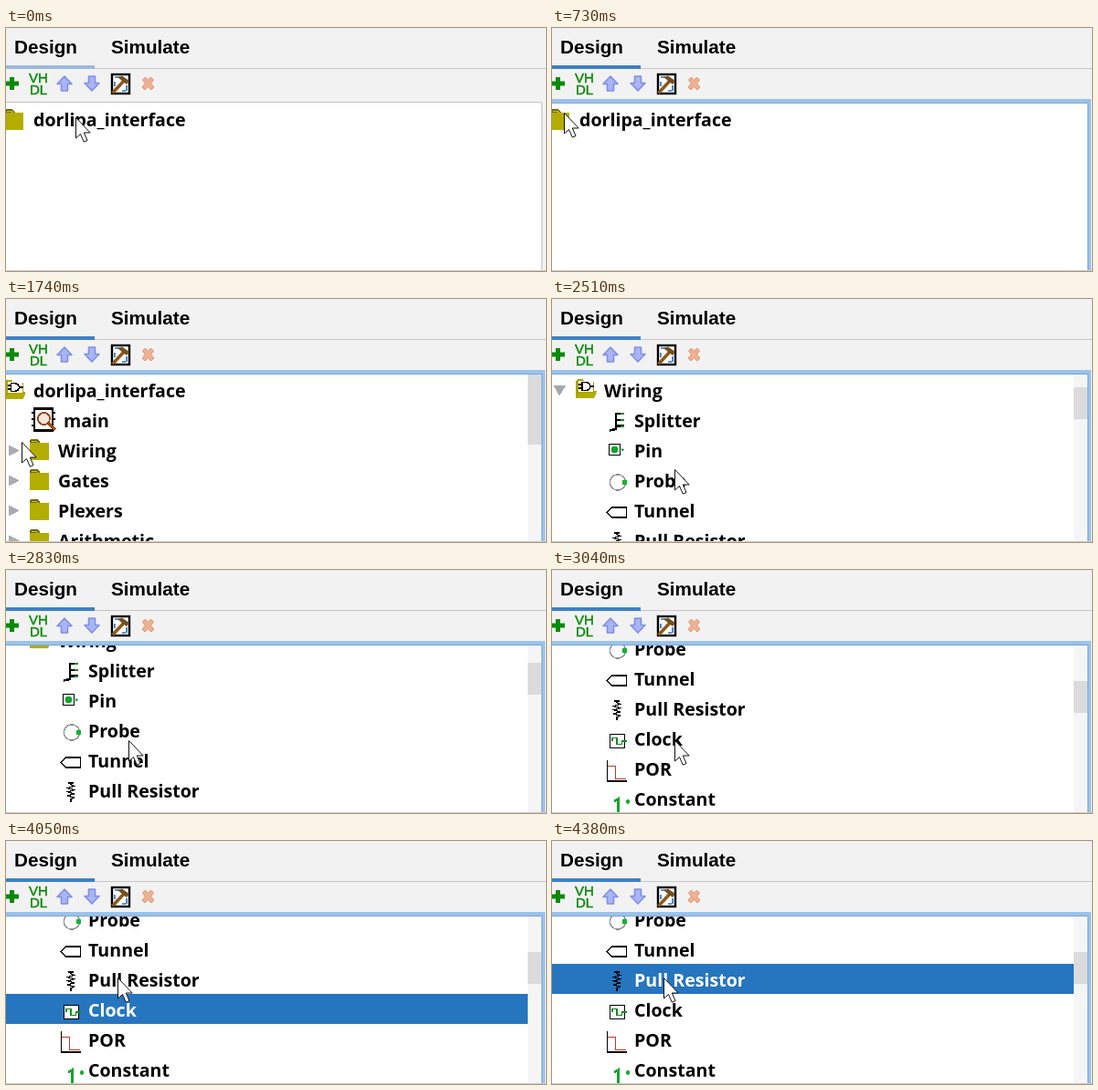
Write an HTML page that moves like this. It is 591 px wide and 267 px high and loops after 4910 ms.

```html
<!DOCTYPE html>
<html lang="en">
<head>
<meta charset="utf-8">
<title>Component tree</title>
<style>
  html, body { margin: 0; width: 100%; height: 100%; overflow: hidden; background: #f2f2f2; }
  svg { display: block; }
  .tab { font: 700 20.7px "Liberation Sans", Arial, sans-serif; }
  .row { font: 700 19.6px "Open Sans", "Noto Sans", sans-serif; }
  .vhdl { font: 15px "Liberation Sans", Arial, sans-serif; fill: #0a8a0a; stroke: #0a8a0a; stroke-width: .5; }
  .icon { shape-rendering: crispEdges; }
  .ink { fill: none; stroke: #000; stroke-width: 1.6; }
</style>
</head>
<body>
<svg width="591" height="267" viewBox="0 0 591 267">
  <defs><clipPath id="view"><rect y="83" width="586" height="183"/></clipPath></defs>
  <rect width="591" height="267" fill="#f2f2f2"/>

  <text class="tab" x="9" y="28">Design</text>
  <text class="tab" x="115" y="28">Simulate</text>
  <path d="M0 44.5H591" stroke="#c6c6c6"/>
  <rect id="underline" y="41" width="97" height="4"/>

  <path d="M0 58.5H4V54H9V58.5H14V63.5H9V68H4V63.5H0Z" fill="#0a8a0a"/>
  <g class="vhdl"><text x="25" y="60">VH</text><text x="26" y="73">DL</text></g>
  <g fill="#a9b5f5" stroke="#7f8fe6" stroke-width="1.6" stroke-linejoin="round">
    <path d="M64 53L72 61.5H67.5V69H60.5V61.5H56Z"/>
    <path d="M94 69L102 60.5H97.5V53H90.5V60.5H86Z"/>
  </g>
  <g>
    <rect x="116" y="51" width="19" height="21" fill="#fff" stroke="#000" stroke-width="2.4"/>
    <path d="M119 54H124M119 59V64M132 63V69M127 69H131" stroke="#2f6db5" stroke-width="1.6"/>
    <path d="M116.500 71.500L130 57" stroke="#8a5a1c" stroke-width="3.600"/>
    <path d="M122 54L127 52.500L135 58L132 62Z" fill="#74501f"/>
  </g>
  <path d="M149.500 57L152.500 54L155.500 57.500L158.500 54L161.500 57L158.500 61L162 65L159 68L155.500 64.500L152 68L149 65L152.500 61Z" fill="#efb191" stroke="#dd9470"/>

  <rect y="82" width="586" height="185" fill="#fff"/>
  <path id="plain" d="M0 81.500H586.500V267" fill="none" stroke="#c2c2c2"/>
  <g id="focus" fill="none">
    <path d="M0 80H588V267" stroke="#9ac3eb" stroke-width="4"/>
    <path d="M0 82.500H586.500V267" stroke="#7ba7d6"/>
  </g>

  <g clip-path="url(#view)">
    <rect id="pick" width="571" height="33" fill="#2675bf"/>
    <g id="tree"></g>
    <g id="bar">
      <rect x="571" y="83" width="15" height="184" fill="#f5f5f5"/>
      <rect id="thumb" x="571" width="15" fill="#dbdbdb"/>
    </g>
  </g>
  <path d="M0 266.500H591" stroke="#cfcfcf"/>

  <g id="tip">
    <rect x="134.500" y="105.500" width="136" height="45" fill="#fafafa" stroke="#a0a0a0"/>
    <text class="row" x="144" y="135">Clock</text>
  </g>
  <circle id="halo" r="18" fill="#f0e146" fill-opacity=".62"/>
  <path id="cursor" d="M.5 .5V23L5.500 18.500L9.300 27.200L13 25.600L9.300 17H16.200Z" fill="#fff" stroke="#111"/>
</svg>
<script>
const LOOP = 4910, ROW = 33, TOP = 83;
const $ = id => document.getElementById(id);

// Icons use stage x and a y measured from the top of their row.
const ink = (d, more = '') => `<path class="ink" d="${d}" ${more}/>`;
const closed = `<path d="M26 10V6l1-1h7l3 3v2z" fill="#6e6a08"/>
  <path d="M28 7h5l2 2" stroke="#c8c23a" fill="none"/><rect x="26" y="9" width="20.500" height="19" fill="#b3ad00"/>`;
const opened = `<path d="M26 26V7l2-2h6l2 3h10v10h3l-3 8z" fill="#a8a200"/>
  <rect x="29" y="7" width="16" height="12" fill="#fff"/>
  <path d="M26 26l4-6h19l-3 6z" fill="#b3ad00"/>
  ${ink('M33 8.500H37Q41.500 9 42 13Q41.500 17 37 17.500H33ZM29 11H33M29 15H33M42 13H46')}`;
const right = '<path d="M2.500 11V24L14.500 17.500Z" fill="#acacac"/>';
const down = '<path d="M1.500 12H15L8.250 23.500Z" fill="#a2a9ae"/>';
const zigzag = Array.from({ length: 7 }, (_, i) => `L${i % 2 ? 67.5 : 74.5} ${12.5 + i * 2.1}`).join('');

const icons = {
  main: `<rect x="31" y="4.500" width="20" height="24" fill="#fff" stroke="#000" stroke-width="2.400"/>
    ${ink('M28 9H31M28 16H31M28 23H31M51 9H54M51 16H54', 'style="stroke-width:2.400"')}
    <path d="M46 20L54 28" stroke="#9a4b1d" stroke-width="3.600"/>
    <circle cx="41.500" cy="15.500" r="6.500" fill="#f4e8dc" stroke="#9a4b1d" stroke-width="1.800"/>`,
  Splitter: ink('M79 10H70V27L63 28.500M70 17H79M70 23.500H79', 'style="stroke-width:2.600"') +
    '<path d="M75 10H79M75 17H79M75 23.500H79" stroke="#128a20" stroke-width="2"/>',
  Pin: ink('M62.500 10.500H74.500V22.500H62.500Z') +
    '<circle cx="68.500" cy="16.500" r="3.600" fill="#10a52a"/><path d="M75.500 14.500L79 16.500L75.500 19Z" fill="#10a52a"/>',
  Probe: `<circle cx="72" cy="19.500" r="8.600" fill="none" stroke="#8c8c8c" stroke-width="1.400"/>
    <circle cx="79.500" cy="19.500" r="2.700" fill="#12b52c"/>`,
  Tunnel: ink('M60 19.500L65.500 14H81.500V25H65.500Z'),
  'Pull Resistor': ink(`M71 8V11${zigzag}L71 26.500V30M68 9H74`, 'style="stroke-width:1.300"'),
  Clock: '<rect x="63.500" y="12.500" width="16" height="15" fill="#fff" stroke="#000" stroke-width="1.600"/>' +
    '<path d="M66 20V16.500H71V23.500H76.500V20H82" fill="none" stroke="#128a20" stroke-width="1.800"/>',
  POR: ink('M60.500 8V31H82') +
    '<path d="M61 14.500H69.500V28.500H81" fill="none" stroke="#c03a22" stroke-width="1.800"/>',
  Constant: '<path d="M68 20L72.500 17.500V32" fill="none" stroke="#12a52a" stroke-width="2.600"/>' +
    '<circle cx="83" cy="20.500" r="2.200" fill="#12b52c"/>'
};

const row = (label, x, icon, i) => `<g transform="translate(0 ${i * ROW})"><g class="icon">${icon}</g>
  <text class="row" x="${x}" y="25">${label}</text></g>`;
const folder = (label, open) => [label, 57, open ? down + opened : right + closed];
const root = open => ['dorlipa_interface', 30, `<g transform="translate(-27.500 1)">${open ? opened : closed}</g>`];
const main = ['main', 63, icons.main];
const parts = Object.keys(icons).slice(1).map(name => [name, 90, icons[name]]);

const trees = [
  [root(false)],
  [root(true), main, ...['Wiring', 'Gates', 'Plexers', 'Arithmetic'].map(n => folder(n, false))],
  [root(true), main, folder('Wiring', true), ...parts]
];
$('tree').innerHTML = trees.map(rows => `<g>${rows.map((r, i) => row(...r, i)).join('')}</g>`).join('');
const groups = [...$('tree').children];
const texts = [...groups[2].querySelectorAll('text')];

// Each move: first step, last step, number of steps, end x, end y.
const moves = [
  [60, 340, 5, 13, 93],
  [1330, 1670, 6, 20, 151],
  [1740, 1740, 1, 17, 157],
  [1810, 1810, 1, 15, 157],
  [1870, 1870, 1, 12, 162],
  [2370, 2510, 3, 134, 187],
  [3780, 4050, 5, 122, 150]
];
const halos = [[600, 730], [800, 870], [1940, 2150], [3390, 3510], [4320, 4380]];

// Stepped progress from 0 to 1; screen updates arrive about every 68 ms.
function progress(t, from, to, n) {
  if (t < from) return 0;
  if (t >= to) return 1;
  return (Math.floor((t - from + 4) / ((to - from) / (n - 1))) + 1) / n;
}
const ease = p => p * p * (3 - 2 * p);

function pointer(t) {
  let x = 76, y = 98;
  for (const [from, to, n, ex, ey] of moves) {
    const p = ease(progress(t, from, to, n));
    x += (ex - x) * p;
    y += (ey - y) * p;
  }
  return [Math.round(x), Math.round(y)];
}

const show = (el, on) => el.setAttribute('visibility', on ? 'inherit' : 'hidden');

function draw(t) {
  const focused = t >= 670;
  const stage = t < 870 ? 0 : t < 2010 ? 1 : 2;
  const scroll = stage < 2 ? 0 : Math.round(66 + 113 * progress(t, 2780, 3040, 5));
  const picked = t < 3450 ? -1 : t < 4320 ? 8 : 7;
  const [x, y] = pointer(t);

  $('underline').setAttribute('fill', focused ? '#3d80c4' : '#9db8df');
  show($('plain'), !focused);
  show($('focus'), focused);

  groups.forEach((g, i) => show(g, i === stage));
  $('tree').setAttribute('transform', `translate(0 ${TOP - scroll})`);
  texts.forEach((el, i) => el.setAttribute('fill', i === picked ? '#fff' : '#000'));
  show($('pick'), picked >= 0);
  $('pick').setAttribute('y', TOP - scroll + picked * ROW);

  show($('bar'), stage > 0);
  $('thumb').setAttribute('y', 82 + Math.round(scroll * .222));
  $('thumb').setAttribute('height', stage === 1 ? 78 : 35);

  show($('tip'), t >= 3240 && t < 3390);
  show($('halo'), halos.some(([a, b]) => t >= a && t < b));
  $('halo').setAttribute('transform', `translate(${x} ${y})`);
  $('cursor').setAttribute('transform', `translate(${x} ${y})`);
}

const start = performance.now();
function tick() {
  draw((performance.now() - start) % LOOP);
  requestAnimationFrame(tick);
}
tick();
</script>
</body>
</html>
```
